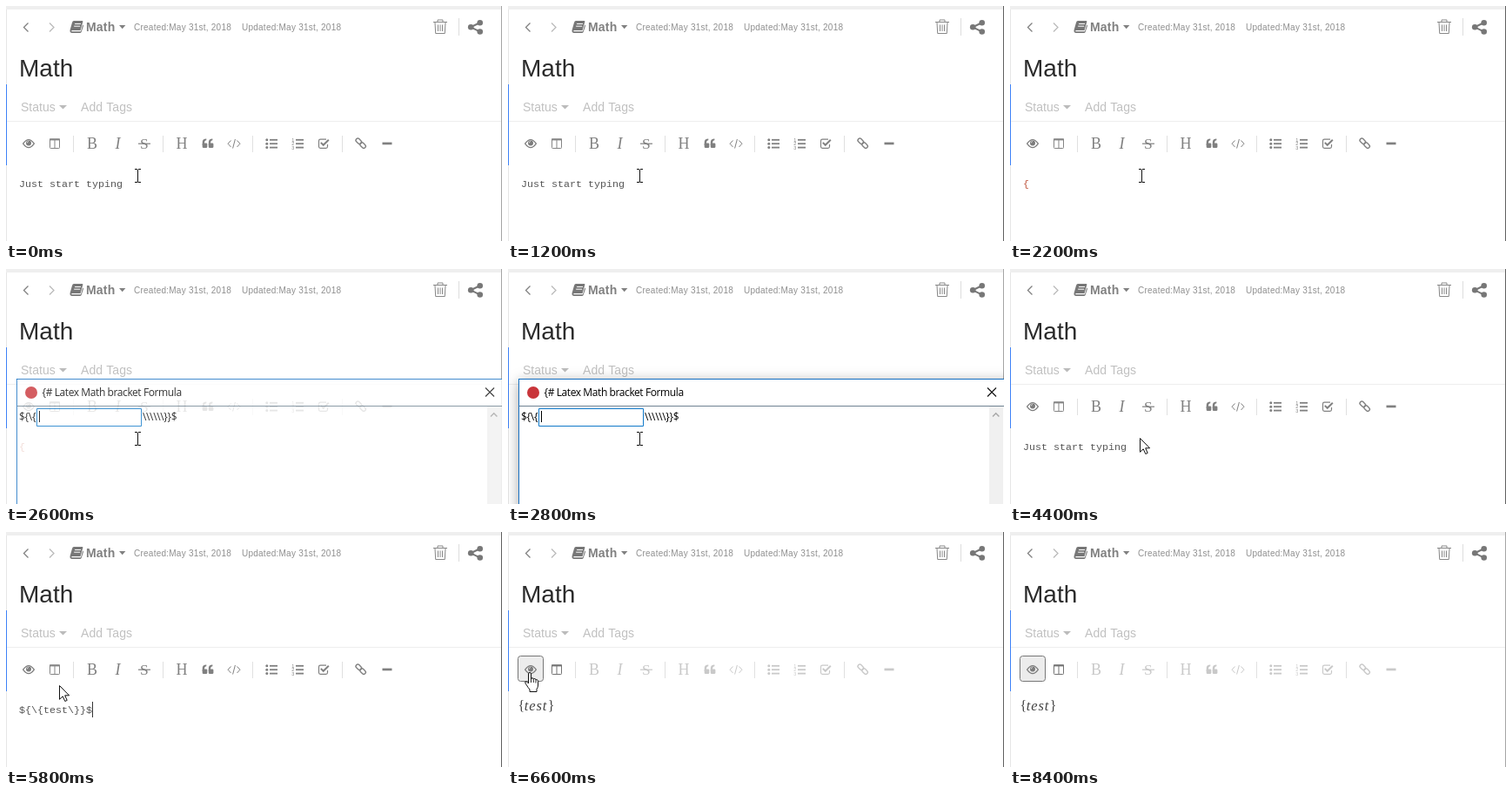
An HTML page with a canvas for the animation above (8600 ms loop, 570 by 270 pixels).

```html
<!DOCTYPE html>
<html lang="en">
<head>
<meta charset="utf-8">
<title>Math note</title>
<style>
html, body { margin: 0; width: 570px; height: 270px; overflow: hidden; background: #fff; }
canvas { display: block; width: 570px; height: 270px; }
</style>
</head>
<body>
<canvas id="stage"></canvas>
<script>
const LOOP = 8600;
const SANS = '"Liberation Sans", Arial, sans-serif';
const SERIF = '"Liberation Serif", Times, serif';
const MONO = '"Liberation Mono", Courier, monospace';
const UI = '"Open Sans", "Noto Sans", sans-serif';

const canvas = document.getElementById('stage');
const ctx = canvas.getContext('2d');
const dpr = window.devicePixelRatio || 1;
canvas.width = 570 * dpr;
canvas.height = 270 * dpr;

function rect(x, y, w, h, color) {
  ctx.fillStyle = color;
  ctx.fillRect(x, y, w, h);
}

function text(str, x, y, font, color, spacing = 0) {
  ctx.font = font;
  ctx.letterSpacing = spacing + 'px';
  ctx.fillStyle = color;
  ctx.fillText(str, x, y);
}

function fill(d, color) {
  ctx.fillStyle = color;
  ctx.fill(new Path2D(d));
}

function line(d, color, width = 1) {
  ctx.strokeStyle = color;
  ctx.lineWidth = width;
  ctx.stroke(new Path2D(d));
}

function dot(x, y, r, color) {
  ctx.fillStyle = color;
  ctx.beginPath();
  ctx.arc(x, y, r, 0, Math.PI * 2);
  ctx.fill();
}

function box(x, y, w, h, r, color, width) {
  ctx.strokeStyle = color;
  ctx.lineWidth = width;
  ctx.beginPath();
  ctx.roundRect(x, y, w, h, r);
  ctx.stroke();
}

// The latest entry of [time, value] pairs that has begun.
function at(steps, t) {
  let value = steps[0][1];
  for (const [start, v] of steps) if (t >= start) value = v;
  return value;
}

const within = (t, ...spans) => spans.some(([a, b]) => t >= a && t < b);

function header() {
  rect(0, 0, 570, 270, '#fff');
  rect(0, 0, 570, 4, '#efefef');
  rect(0, 4, 1, 266, '#e6e6e6');
  rect(0, 90, 1, 93, '#3f82f7');

  line('M25.5 19.5L20.5 24.5L25.5 29.5', '#808080', 1.3);
  line('M50 19.5L55 24.5L50 29.5', '#bbb', 1.3);

  fill('M78 17H87.5Q88.7 17 88.3 18.3L85.5 28H76Q75 28 75.3 29.2H86L88.2 21.5Q89.4 22 88.8 23.5L86.6 30Q86.2 31 85 31H75.5Q73 30.5 73.6 27.5L76 19Q76.5 17 78 17Z', '#777');
  line('M79 20.5H86M78.2 23.2H85.2', '#fff', 1);

  text('Math', 92, 29, 'bold 14px ' + SANS, '#808080', 0.2);
  fill('M130 22H137.4L133.7 26.2Z', '#808080');
  text('Created:May 31st, 2018', 147, 28, '10px ' + SANS, '#8f8f8f', 0.24);
  text('Updated:May 31st, 2018', 271, 28, '10px ' + SANS, '#8f8f8f', 0.24);

  line('M491 18.5H507M496 18V16H502V18M493 19L493.7 31.5H504.3L505 19M496.5 21.5V29M499 21.5V29M501.5 21.5V29', '#888', 1);
  rect(520, 14, 1, 20, '#ddd');
  line('M545 19L534 24.3L545 29.7', '#777', 2);
  dot(544.7, 19.2, 3.3, '#777');
  dot(534.2, 24.3, 3.3, '#777');
  dot(544.7, 29.5, 3.3, '#777');

  text('Math', 15, 81, '28px ' + SANS, '#2b2b2b');
  text('Status', 17, 121, '14px ' + SANS, '#c0c0c0');
  fill('M61 114H70L65.5 118.6Z', '#bbb');
  text('Add Tags', 86, 121, '14px ' + SANS, '#c0c0c0', 0.1);
  rect(1, 132, 568, 1, '#eee');
}

function quoteMark(x, c) {
  ctx.fillStyle = c;
  ctx.beginPath();
  ctx.roundRect(x, 157.5, 5.6, 5.5, 1.3);
  ctx.fill();
  fill(`M${x} 160V156.5Q${x} 152.5 ${x + 4.6} 152.5V154.3Q${x + 2.3} 154.6 ${x + 2.3} 157.5V160Z`, c);
}

function toolbar(hot, preview) {
  if (hot) {
    ctx.fillStyle = '#ececec';
    ctx.beginPath();
    ctx.roundRect(11.5, 142.5, 29, 29, 3);
    ctx.fill();
    box(11.5, 142.5, 29, 29, 3, '#777', 1);
  }
  const eye = '#7c7c7c';
  line('M19.6 158.2Q26 148.9 32.4 158.2Q26 167.2 19.6 158.2Z', eye, 1.2);
  dot(26, 157.4, 3, eye);
  line('M24.3 157.3Q24.4 155.7 26 155.6', '#fff', 0.7);

  const pane = preview ? '#737373' : '#858585';
  box(50.5, 153, 11, 10.5, 0.8, pane, 1);
  rect(50, 152.4, 12, 2, pane);
  rect(55.5, 153, 1, 10.5, pane);

  for (const x of [77, 180, 283, 386]) rect(x, 149, 1, 19, '#e0e0e0');

  const c = preview ? '#c9c9c9' : '#808080';
  text('B', 93, 164, '18px ' + SERIF, c);
  text('I', 125.5, 164, 'italic 18px ' + SERIF, c);
  text('S', 154, 164, '17.5px ' + SERIF, c);
  rect(152, 157.6, 14, 1.2, c);
  text('H', 195.5, 164, '18px ' + SERIF, c);
  quoteMark(225.7, c);
  quoteMark(232.8, c);
  line('M258.5 154.5L255 158.2L258.5 162M265.5 154.5L269 158.2L265.5 162M263.4 153L260.6 163.5', c, 1);

  for (let i = 0; i < 3; i++) {
    const y = 153.8 + i * 4.4;
    dot(299.8, y, 1.5, c);
    rect(303, y - 0.9, 9, 1.8, c);
    text(String(i + 1), 328.2, y + 2, '5.5px ' + SANS, c);
    rect(333, y - 0.9, 9, 1.8, c);
  }

  line('M369.5 159V161.5Q369.5 163.3 367.7 163.3H361.3Q359.5 163.3 359.5 161.5V155Q359.5 153.2 361.3 153.2H368', c, 1.2);
  line('M361.8 156.9L364.7 159.8L370.8 153.7', c, 2);

  ctx.save();
  ctx.translate(407.7, 157.7);
  ctx.rotate(Math.PI / 4);
  box(-7, -2.2, 7.3, 4.4, 2, c, 1.4);
  box(-0.3, -2.2, 7.3, 4.4, 2, c, 1.4);
  ctx.restore();

  rect(432.5, 156.6, 11, 2.7, c);
}

function editor(t, preview) {
  if (preview) {
    text('{', 11.5, 205, '16px ' + SERIF, '#444');
    text('test', 18.8, 205, 'italic 16.5px ' + SERIF, '#444', 0.9);
    text('}', 45.7, 205, '16px ' + SERIF, '#444');
    return;
  }
  const [str, color] = at([
    [0, ['Just start typing', '#555']],
    [1600, ['{', '#c0563f']],
    [4400, ['Just start typing', '#555']],
    [4800, ['${\\{test\\}}$', '#555']]
  ], t);
  text(str, 15, 208, '11.667px ' + MONO, color);

  if (within(t, [600, 1200], [1600, 2200], [4600, 5400], [5800, 6400])) {
    rect(at([[0, 15], [1600, 22], [4600, 15], [4800, 99]], t), 195, 1, 18, '#333');
  }
}

function dialog(t) {
  const open = t >= 2800;
  ctx.save();
  if (open) {
    ctx.shadowColor = 'rgba(0,0,0,0.35)';
    ctx.shadowBlur = 14 * dpr;
    ctx.shadowOffsetY = 3 * dpr;
  } else {
    ctx.globalAlpha = 0.8;
  }
  rect(12, 126, 600, 200, '#fff');
  ctx.shadowColor = 'transparent';
  rect(12, 126, 558, 1, '#1670c2');
  rect(12, 126, 1, 144, '#1670c2');
  rect(13, 157, 557, 1, '#6f8291');

  dot(29, 142, 7, '#c9353a');
  text('{# Latex Math bracket Formula', 41.5, 146, '12px ' + UI, '#000', -0.4);
  line('M551 136.5L561 146.5M561 136.5L551 146.5', '#111', 1.1);

  rect(553, 158, 16, 112, '#f0f0f0');
  line('M557 169.5L560.7 165.8L564.4 169.5', '#a8a8a8', 1.5);

  const font = '12px ' + UI;
  text('${\\{', 15, 174, font, '#000', -0.3);
  text('\\\\\\\\\\\\}}$', 157, 174, font, '#000', -0.35);
  box(35.5, 160.5, 120, 20, 0, '#1079c9', 1);

  const [typed, caret] = at([[0, ['', 38]], [3600, ['t', 42]], [3800, ['tes', 53]], [4000, ['test', 57]]], t);
  text(typed, 38, 174, font, '#000', -0.3);
  if (!within(t, [3400, 3600])) rect(caret, 163, 1, 13, '#000');
  ctx.restore();
}

const cursors = {
  beam() {
    line('M0 .5H3M4 .5H7M3.5 1V15.5M0 15.5H3M4 15.5H7', '#111', 1);
  },
  arrow() {
    const d = 'M.5 .5V16.3L4.2 12.8L6.8 18.5L9.2 17.4L6.7 11.8H11.6Z';
    fill(d, '#fff');
    line(d, '#111', 1);
  },
  hand() {
    const d = 'M4.5 13V2Q4.5 .5 6 .5T7.5 2V8Q7.5 6.7 9 6.8T10.3 8.2Q10.6 7.3 11.8 7.5T13 9Q13.4 8.4 14.4 8.7T15.5 10.5V15Q15.5 17.5 14 19.5V22.5H6V20Q3.8 17.5 2.2 14.6Q.2 12 .8 11Q2.2 9.8 4.5 13Z';
    fill(d, '#fff');
    line(d, '#111', 1);
    line('M7.5 8V12M10.3 8.2V12M13 9V12.5', '#111', 0.9);
  }
};

const pointer = [
  [0, ['beam', 148, 187]],
  [3600, null],
  [4400, ['arrow', 149, 194]],
  [4600, ['beam', 148, 187]],
  [5600, ['arrow', 130, 185]],
  [5800, ['arrow', 61, 176]],
  [6000, ['hand', 19, 161]],
  [7000, ['arrow', 3, 171]],
  [7200, null]
];

function draw(t) {
  ctx.setTransform(dpr, 0, 0, dpr, 0, 0);
  const preview = t >= 6600;
  const focused = within(t, [600, 2600], [4400, 8400]);
  header();
  toolbar(t >= 6000, preview);
  editor(t, preview);
  rect(569, 0, 1, 270, focused ? '#606060' : '#a6a6a6');
  if (within(t, [2600, 4400])) dialog(t);

  const cursor = at(pointer, t);
  if (cursor) {
    ctx.save();
    ctx.translate(cursor[1], cursor[2]);
    cursors[cursor[0]]();
    ctx.restore();
  }
}

let begin = null;
function tick(now) {
  if (begin === null) begin = now;
  draw((now - begin) % LOOP);
  requestAnimationFrame(tick);
}
draw(0);
requestAnimationFrame(tick);
</script>
</body>
</html>
```
